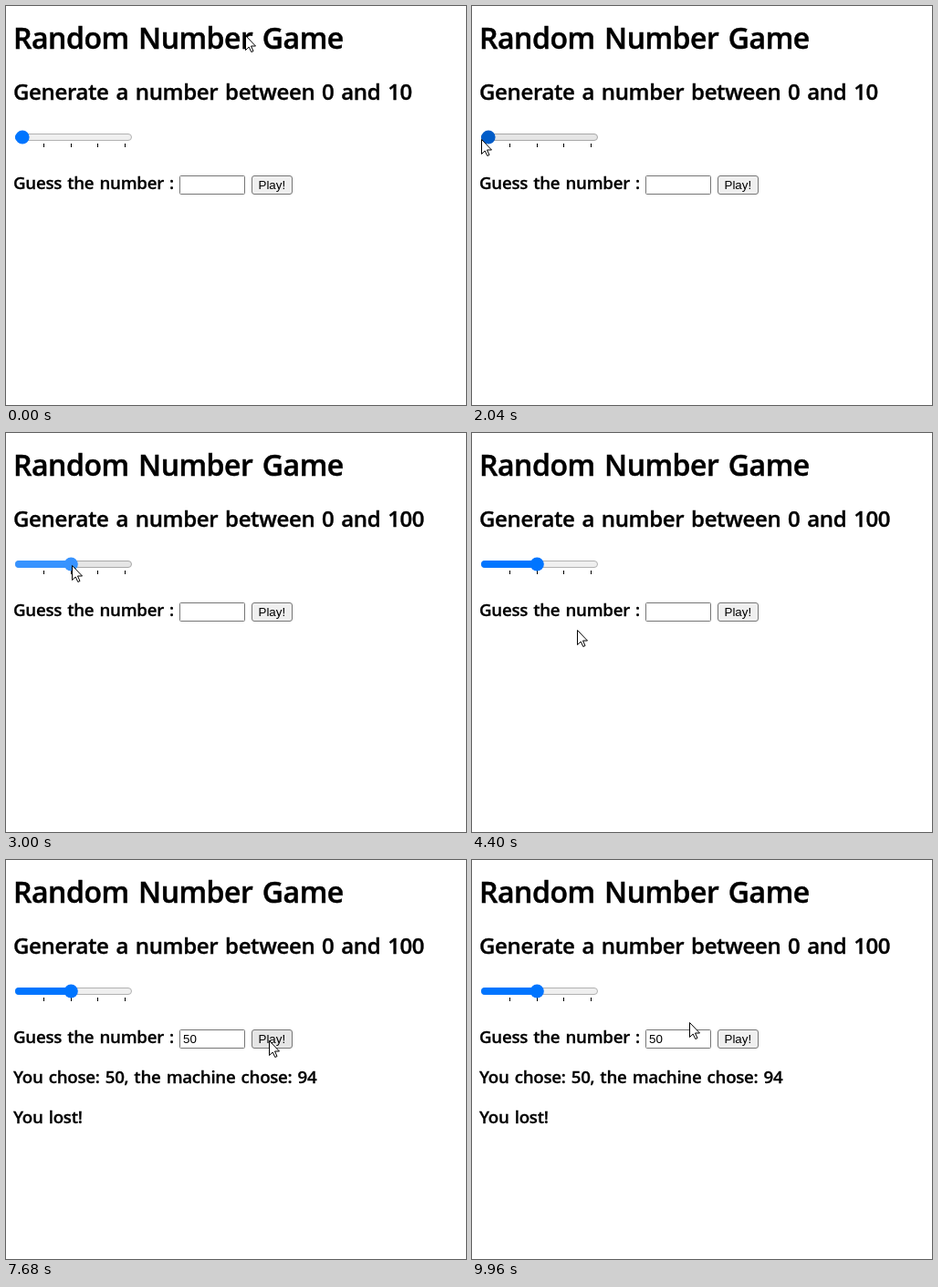
Animation of 504 by 438 pixels, one loop 10 s. Source, as an HTML page:

```html
<!DOCTYPE html>
<html lang="en">
<head>
<meta charset="utf-8">
<title>Random Number Game</title>
<style>
  html, body { margin: 0; width: 100%; height: 100%; overflow: hidden; background: #fff; }
  svg { display: block; width: 504px; height: 438px; }
  .head {
    font-family: "Open Sans", "Noto Sans", sans-serif; font-weight: 600;
    letter-spacing: -.0145em; word-spacing: .08em;
    stroke: #000; stroke-width: .015em;
  }
  .h1 { font-size: 32px; }
  .h2 { font-size: 24px; }
  .h3 { font-size: 18.72px; }
  .ctl { font: 13.333px "Liberation Sans", Arial, sans-serif; }
  #box { fill: #fff; stroke: #767676; }
  #box.focus { stroke: #101010; stroke-width: 2px; }
</style>
</head>
<body>
<svg viewBox="0 0 504 438">
  <text class="head h1" x="8" y="47">Random Number Game</text>
  <text class="head h2" x="8" y="103" id="range"></text>

  <rect id="track" x="10.5" y="140.5" width="127" height="7" rx="3.5"/>
  <rect id="fill" x="10" y="140" height="8" rx="4"/>
  <path id="ticks" stroke="#000"/>
  <circle id="thumb" cy="144" r="7.6"/>

  <text class="head h3" x="8" y="201">Guess the number :</text>
  <rect id="box" x="190.5" y="186.5" width="71" height="20" rx="1"/>
  <text class="ctl" x="194" y="201" id="guess"></text>
  <rect id="caret" y="189" width="1" height="15"/>
  <rect id="button" x="269.5" y="186.5" width="44" height="20" rx="2.5" stroke="#767676"/>
  <text class="ctl" x="276.5" y="201">Play!</text>

  <g id="result" class="head h3">
    <text x="8" y="245">You chose: 50, the machine chose: 94</text>
    <text x="8" y="289">You lost!</text>
  </g>

  <g id="cursor">
    <path id="arrow" d="M.5 .5V16.5L4.2 13L6.8 18.5L9 17.5L6.5 12H11.5Z" fill="#fff" stroke="#000"/>
    <path id="beam" d="M-3 -7.5H0M1 -7.5H4M.5 -7V7M-3 7.5H0M1 7.5H4" fill="none" stroke="#000"/>
  </g>
</svg>
<script>
const LOOP = 10000, STEP = 40, BLINK = 500;
const FOCUS = 4900, TYPED = 6160, PRESS = 7560, RELEASE = 7640;

const el = id => document.getElementById(id);
const set = (id, attrs) => {
  for (const k in attrs) el(id).setAttribute(k, attrs[k]);
};
const show = (id, on) => set(id, { visibility: on ? 'visible' : 'hidden' });
const within = (t, a, b) => t >= a && t < b;
const clamp = (v, lo, hi) => Math.min(hi, Math.max(lo, v));
const ease = p => p * p * (3 - 2 * p);
const progress = (t, a, b) => ease(clamp((t - a) / (b - a), 0, 1));

// Pointer glides: start, end, x, y and an optional downward bow
const home = { x: 262, y: 32 };
const glides = [
  [0, 520, 399, 383],
  [1480, 1520, 0, 30],
  [1520, 2520, 18, 136, 60],
  [2560, 3000, 72, 145],
  [3720, 4400, 115, 216],
  [4400, 4760, 246, 199],
  [4840, 5080, 266, 189],
  [6640, 6680, 220, 208],
  [6720, 7200, 288, 198, 26],
  [7920, 8680, 278, 286, 80],
  [8680, 8920, 280, 226],
  [9000, 9440, 284, 192],
  [9720, 9960, 238, 178]
];

function pointer(t) {
  let { x, y } = home;
  for (const [from, to, tx, ty, bow = 0] of glides) {
    if (t < from) break;
    const p = progress(t, from, to);
    x += (tx - x) * p;
    y += (ty - y) * p + bow * Math.sin(Math.PI * p);
  }
  return [Math.round(x), Math.round(y)];
}

// Slider values run from 10 to 200
const sliderX = v => 18 + 112.4 * (v - 10) / 190;
const ticks = [50, 100, 150, 200].map(v => `M${Math.floor(sliderX(v)) + .5} 151v4`);
set('ticks', { d: ticks.join('') });

function draw(t) {
  const [x, y] = pointer(t);
  const over = (l, top, r, b) => x >= l && x <= r && y >= top && y <= b;

  const value = 10 + 10 * Math.round(9 * progress(t, 2560, 3000));
  const cx = sliderX(value);
  const hot = over(10, 136, 139, 152);
  const blue = within(t, 2560, 3760) ? '#3793ff' : hot ? '#005cc8' : '#0075ff';
  el('range').textContent = 'Generate a number between 0 and ' + value;
  set('track', { fill: hot ? '#e5e5e5' : '#efefef', stroke: hot ? '#a8a8a8' : '#b2b2b2' });
  set('fill', { width: cx - 10, fill: blue });
  set('thumb', { cx, fill: blue });

  const focus = within(t, FOCUS, PRESS);
  const count = clamp((t - TYPED) / STEP + 3, 0, 2);
  const blink = Math.floor((t - (t < TYPED ? FOCUS + 20 : TYPED)) / BLINK);
  el('box').classList.toggle('focus', focus);
  el('guess').textContent = '50'.slice(0, count);
  set('caret', { x: 194 + 7 * count });
  show('caret', focus && blink % 2 === 0);

  const face = within(t, PRESS, RELEASE) ? '#f5f5f5'
    : over(269, 186, 314, 207) ? '#e5e5e5' : '#efefef';
  set('button', { fill: face });
  show('result', t >= RELEASE);

  const seen = !within(t, 1320, 1520);
  const typing = over(190, 186, 262, 208);
  set('cursor', { transform: `translate(${x} ${y})` });
  show('arrow', seen && !typing);
  show('beam', seen && typing);
}

const start = performance.now();
function tick() {
  const t = (performance.now() - start) % LOOP;
  draw(Math.floor(t / STEP) * STEP);
  requestAnimationFrame(tick);
}
tick();
</script>
</body>
</html>
```
